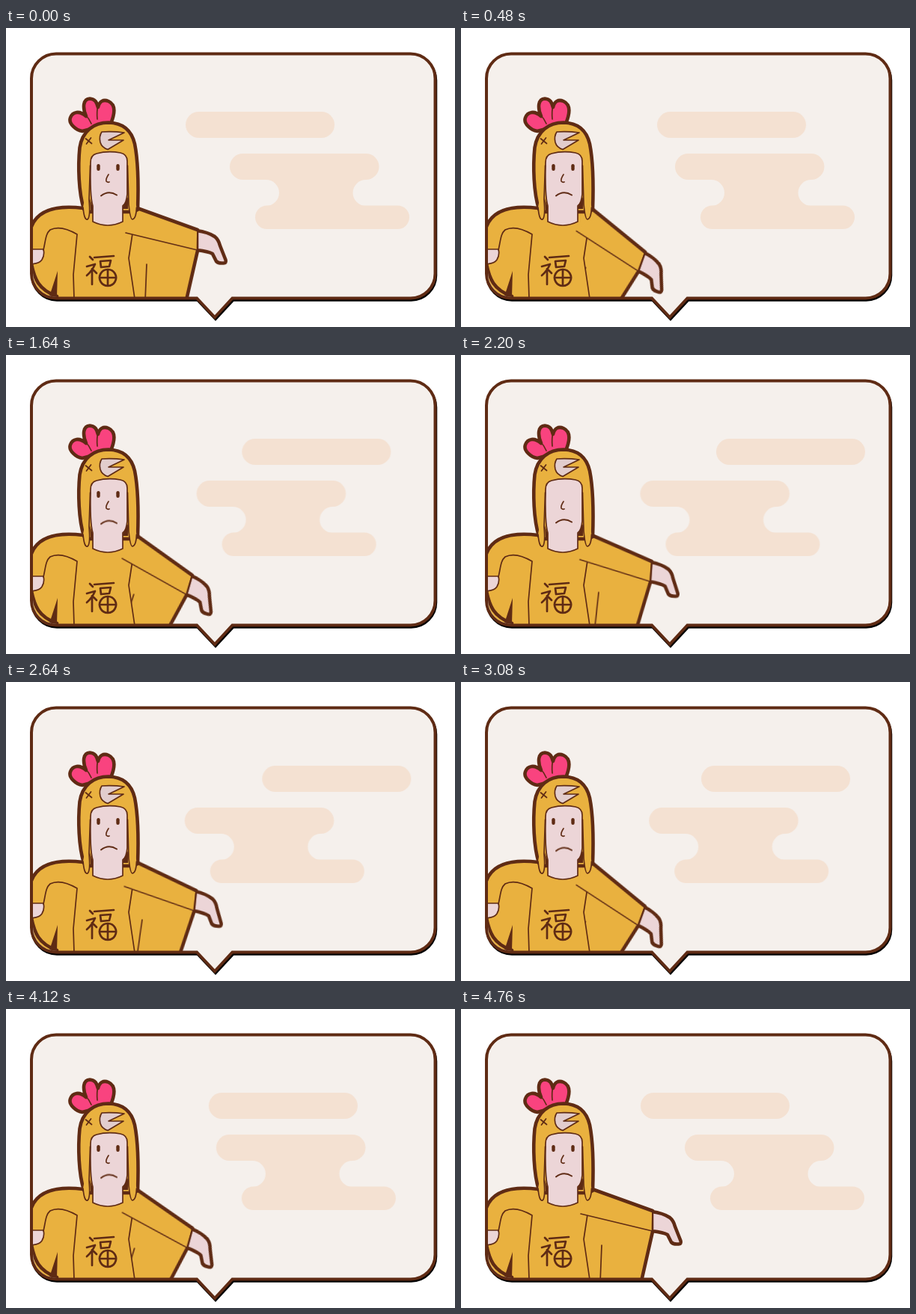
Write an HTML page without scripts that moves like this. It is 600x400 px and loops after 4800 ms.

```html
<!DOCTYPE html>
<html lang="en">
<head>
<meta charset="utf-8">
<title>Rooster suit</title>
<style>
  html, body { margin: 0; width: 100%; height: 100%; overflow: hidden; background: #fff; }
  svg { display: block; width: 600px; height: 400px; }

  .paper { fill: #f5f0ec; }
  .cloud { fill: #f4e1d2; }
  .suit { fill: #e9b13f; }
  .skin { fill: #ecd5d7; }
  .comb { fill: #f9437f; }
  .dark { fill: #5f2b14; }
  .bold, .thin { stroke: #5f2b14; stroke-linecap: round; stroke-linejoin: round; }
  .bold { stroke-width: 4.6; }
  .thin { stroke-width: 1.7; }
  .line { fill: none; }
  .glyph { stroke-width: 2.7; }

  .high, .low, .arm, .eyes, .mouth { animation: 4.8s linear infinite; }
  .high { animation-name: drift-right; }
  .low { animation-name: drift-left; }
  .arm { animation-name: wave; transform-origin: 164px 256px; }
  .eyes { animation-name: blink; animation-timing-function: step-end; }
  .mouth { animation-name: pout; stroke-width: 2; }

  @keyframes drift-right {
    0%, 99.17%, 100% { transform: none; }
    50.83% { transform: translateX(112px); }
  }
  @keyframes drift-left {
    0%, 99.17%, 100% { transform: none; }
    50.83% { transform: translateX(-66px); }
  }
  /* Four waves, 1250 ms apart: steady down, accelerating up, short rest */
  @keyframes wave {
    0%, 20.83%, 26.04%, 46.88%, 52.08%, 72.92%, 78.13%, 98.96%, 100% { transform: rotate(0deg); }
    10.42%, 36.46%, 62.5%, 88.54% {
      transform: rotate(20.2deg);
      animation-timing-function: cubic-bezier(.33, 0, .67, .33);
    }
  }
  @keyframes blink {
    0%, 5%, 25.83%, 46.66%, 67.5%, 88.33%, 100% { visibility: visible; }
    3.33%, 24.16%, 45%, 65.83%, 86.66% { visibility: hidden; }
  }
  @keyframes pout {
    0%, 14%, 45%, 59%, 98%, 100% { transform: none; }
    20%, 34%, 64%, 94% { transform: translateY(1.5px); }
  }
</style>
</head>
<body>
<svg viewBox="0 0 600 400">
  <defs>
    <path id="bubble" d="M67 34.5H540.500A33 33 0 0 1 573.500 67.500V328.500A33 33 0 0 1 540.500 361.500H302.500L279 387L255 361.500H67A33 33 0 0 1 34 328.500V67.500A33 33 0 0 1 67 34.500Z"/>
    <clipPath id="inside">
      <path d="M36 36H573V360H68A32 32 0 0 1 36 328Z"/>
    </clipPath>
  </defs>

  <use href="#bubble" x="1" y="2.500" fill="#000" stroke="#000" stroke-width="3.500"/>
  <use href="#bubble" class="paper"/>

  <g class="cloud">
    <rect class="high" x="240" y="112" width="199" height="35" rx="17.5"/>
    <g class="low">
      <rect x="299" y="168" width="199.500" height="35" rx="17.5"/>
      <rect x="333" y="237.500" width="206" height="31.500" rx="15.7"/>
      <path d="M347.500 203a17.500 17.500 0 0 1 0 35H481a17.500 17.500 0 0 1 0-35Z"/>
    </g>
  </g>

  <g clip-path="url(#inside)">
    <!-- sleeve and hand behind the body -->
    <g class="arm">
      <path class="skin bold" d="M255 271Q270 273 279 279Q284 283 286 291L293.500 310Q295 315 290 314.500Q284 315 281 312L276 302Q271 299 255 297Z"/>
      <path class="suit" d="M150 236H166L256 270L255.500 297L242 362L222 400H130Z"/>
      <path class="line bold" d="M170 239L256 270M256 298L241.500 362"/>
      <path class="line thin" d="M256 270L255.500 297M188 316L186 366"/>
    </g>

    <!-- body and left sleeve -->
    <path class="suit" d="M32 272C40 244 62 236 103 241L168 242L170 268L164 308L172 362H30Z"/>
    <path class="line bold" d="M32 272C38 246 62 236 103 241"/>
    <path class="line thin" d="M169 275L164 308L172 362"/>
    <path class="skin thin" d="M30 296H50Q52 303 48 310Q44 316 30 316Z"/>
    <path class="line bold" d="M34 316C38 335 43 350 68 359"/>
    <path class="line thin" d="M50 297C53 284 53 275 59 270Q73 263 95 276L90 330L91 362"/>
    <path class="dark" d="M69 325L58 359H68Z"/>

    <!-- sleeve in front of the body -->
    <g class="arm">
      <path class="suit" d="M160 274L255 297L254 273L183 250L168 258Z"/>
      <path class="line thin" d="M160 274L255.500 297L256 270"/>
    </g>

    <!-- chest character -->
    <g class="line thin glyph">
      <path d="M112 306L116 310M108 319L119 316Q115 325 108 331M115 322V343M117 324L121 328"/>
      <path d="M118 307L144 305M126 312L140 311L138 319L127 320Z"/>
      <path d="M136 323a11 11 0 1 0 .1 0ZM136 323V345M125 334H147"/>
    </g>

    <!-- comb -->
    <path class="comb bold" d="M102 138C94 137 83 128 86 120C89 112 98 110 107 118C102 106 103 95 112 94.500C119 95 121 99 123 106C125 98 130 95 137 98C148 103 145 116 140 128Z"/>
    <path class="line thin" d="M106 116Q111 121 114 128M123 104Q121 111 122 122"/>

    <!-- hood -->
    <path class="suit bold" d="M104 242C97 220 96 185 98.500 160C102 138 117 126.500 137 126.500C157 127 168 138 172 155C177 180 177 215 176 243L170 246H108Z"/>
    <path class="dark" d="M112 228L117 243L113 245ZM163 226L155 242L163 242Z"/>
    <path class="skin thin" d="M113 180Q113 170 121 168Q136 164 153 167Q162 169 162 178V222Q161 234 156 238V259Q136 269 116 259V238Q112 225 113 180Z"/>
    <path class="suit thin" d="M103 240C104 252 106 257 109 256Q113 253 111 230L112.500 184M162.500 184L164 236Q166 256 169 256Q174 255 174.500 240"/>
    <path class="line thin" d="M106.500 148L114.500 154.500M113.500 147L107.500 155"/>
    <path class="thin" fill="#e2cdcd" d="M128 139Q143 138 158 140L137 150L157 150L136 162.500Q128 160 126 153Q124 145 128 139Z"/>

    <!-- face -->
    <g class="dark eyes">
      <rect x="121.300" y="182" width="4.400" height="9" rx="2.200"/>
      <rect x="147.300" y="182" width="4.400" height="9" rx="2.200"/>
    </g>
    <path class="line thin" d="M137 196Q133 202 134 205Q136 207 138 206"/>
    <path class="line thin mouth" d="M127 224.500Q137 216.500 148 223.500"/>
  </g>

  <use href="#bubble" fill="none" stroke="#5f2b14" stroke-width="4"/>
</svg>
</body>
</html>
```
